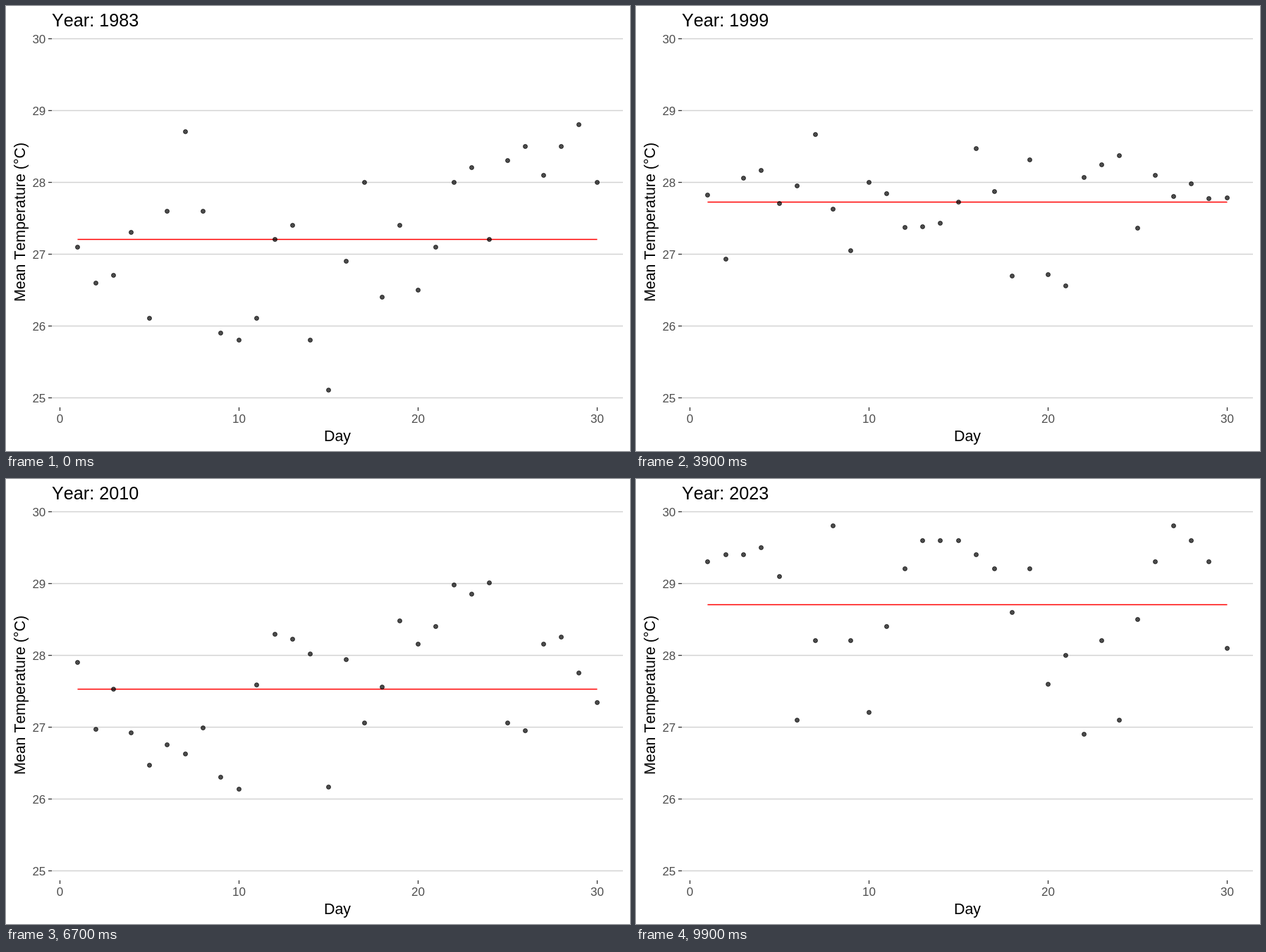
These frames come from a looping animation (885 px wide and 632 px high, 10 s). An HTML page with a canvas:

```html
<!DOCTYPE html>
<html lang="en">
<head>
<meta charset="utf-8">
<title>Mean temperature by day</title>
<style>
  html, body { margin: 0; width: 100%; height: 100%; overflow: hidden; background: #fff; }
  canvas { display: block; }
</style>
</head>
<body>
<canvas id="chart" width="885" height="632"></canvas>
<script>
const ctx = document.getElementById('chart').getContext('2d');
const FRAMES = 100, STEP = 100, FIRST_YEAR = 1983, LAST_YEAR = 2023, DAYS = 30;

const mix = (a, b, k) => a + (b - a) * k;
// Positions snap to pixel centres
const snap = v => Math.floor(v) + 0.5;
const xOf = day => snap(76.3 + day * 25.4);
const yOf = tenths => snap(556.1 - (tenths - 250) * 10.193);

// Days left out lie on a straight line between their neighbours
function fillGaps(known) {
  return Array.from({ length: DAYS }, (_, d) => {
    let a = d, b = d;
    while (!(a in known)) a--;
    while (!(b in known)) b++;
    return a === b ? known[d] : Math.round(mix(known[a], known[b], (d - a) / (b - a)));
  });
}

// One month of daily temperatures in tenths of a degree, ten years apart
const months = [
  [271, 266, 267, 273, 261, 276, 287, 276, 259, 258, 261, 272, 274, 258, 251,
   269, 280, 264, 274, 265, 271, 280, 282, 272, 283, 285, 281, , 288, 280],
  [270, 288, 280, 277, 270, 269, 275, 264, 281, 287, 286, 279, 261, 276, 286,
   , 288, 285, 289, , 265, 276, , 289, 294, 281, 271, , , 279],
  [284, 256, 281, 285, 282, 287, 295, 285, 263, 275, , 270, 283, 273, 271,
   283, 272, 254, 279, 260, 266, 284, , 280, 259, 281, , 284, 279, 277],
  [277, , 273, 263, 258, 260, 255, 264, 263, 256, 277, 288, 282, 283, 258,
   278, 270, 284, , 290, , 292, 291, 294, 275, 265, 281, 282, , 272],
  [293, , , 295, 291, 271, 282, 298, 282, 272, 284, 292, 296, , 296,
   , 292, 286, 292, 276, 280, 269, 282, 271, 285, 293, 298, , 293, 281]
].map(fillGaps);
const means = months.map(m => Math.round(m.reduce((a, b) => a + b) / DAYS));
const keyFrame = i => Math.round(i * 24.74);

function line(x1, y1, x2, y2, color) {
  ctx.strokeStyle = color;
  ctx.lineWidth = 1.3;
  ctx.beginPath();
  ctx.moveTo(x1, y1);
  ctx.lineTo(x2, y2);
  ctx.stroke();
}

function text(str, x, y, size, color, align) {
  ctx.font = `${size}px "Liberation Sans", Arial, sans-serif`;
  ctx.fontKerning = 'none';
  ctx.fillStyle = color;
  ctx.textAlign = align;
  ctx.fillText(str, x, y);
}

function dot(x, y) {
  ctx.fillStyle = ctx.strokeStyle = 'rgba(0,0,0,0.7)';
  ctx.lineWidth = 1;
  ctx.beginPath();
  ctx.arc(x, y, 3, 0, 2 * Math.PI);
  ctx.fill();
  ctx.stroke();
}

function drawAxes() {
  for (let t = 25; t <= 30; t++) {
    const y = yOf(t * 10);
    line(65, y, 875, y, '#d3d3d3');
    line(60, y, 65, y, '#333');
    text(t, 56.3, y + 6.7, 17, '#4d4d4d', 'right');
  }
  for (let d = 0; d <= DAYS; d += 10) {
    line(xOf(d), 570, xOf(d), 575, '#333');
    text(d, xOf(d), 592, 17, '#4d4d4d', 'center');
  }
  text('Day', 470, 618, 21.4, '#000', 'center');
  ctx.save();
  ctx.translate(27, 307);
  ctx.rotate(-Math.PI / 2);
  text('Mean Temperature (°C)', 0, 0, 21.4, '#000', 'center');
  ctx.restore();
}

function draw(now) {
  const frame = Math.floor(now / STEP) % FRAMES;
  let i = 0;
  while (i < months.length - 2 && frame >= keyFrame(i + 1)) i++;
  const k = (frame - keyFrame(i)) / (keyFrame(i + 1) - keyFrame(i));
  const year = Math.round(mix(FIRST_YEAR, LAST_YEAR, frame / (FRAMES - 1)));

  ctx.fillStyle = '#fff';
  ctx.fillRect(0, 0, 885, 632);
  drawAxes();
  text('Year: ' + year, 65, 29, 25.2, '#000', 'left');

  const meanY = yOf(mix(means[i], means[i + 1], k));
  line(xOf(1), meanY, xOf(DAYS), meanY, '#f00');
  months[i].forEach((temp, d) => dot(xOf(d + 1), yOf(mix(temp, months[i + 1][d], k))));
}

const start = performance.now();
function tick() {
  draw(performance.now() - start);
  requestAnimationFrame(tick);
}
tick();
</script>
</body>
</html>
```
